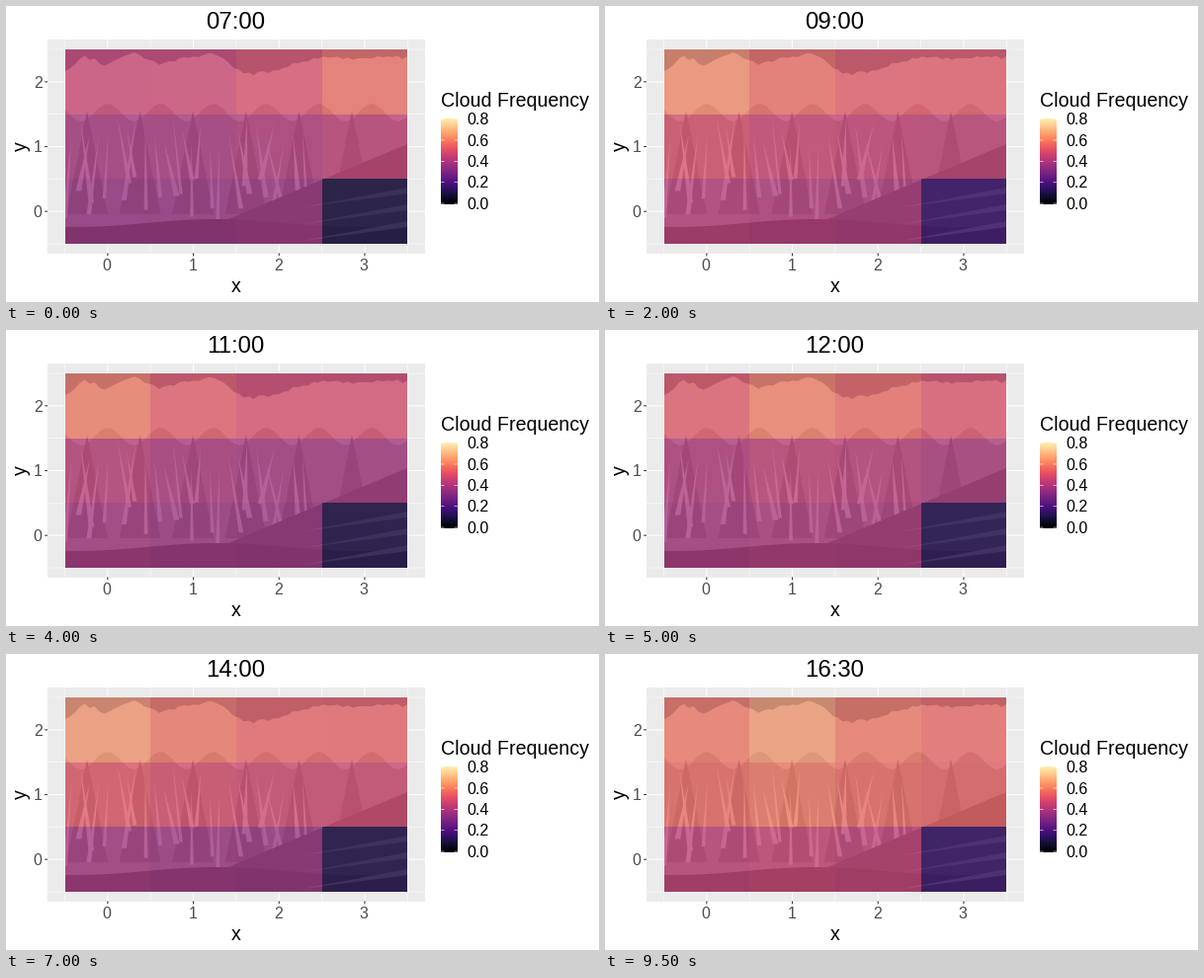
Animation of 600x300 px, one loop 10000 ms. Source, as a matplotlib script:

```python
import numpy as np
import matplotlib.pyplot as plt
from matplotlib.animation import FuncAnimation
from matplotlib.patches import Polygon, Rectangle

plt.rcParams["font.family"] = "Liberation Sans"

DPI = 100
FRAMES, INTERVAL = 20, 500
LEFT, RIGHT, TOP, BOTTOM = 59.5, 406.3, 44, 241
X_EDGES = np.linspace(LEFT, RIGHT, 5)
Y_EDGES = np.linspace(TOP, BOTTOM, 4)
X_CENTERS = (X_EDGES[:-1] + X_EDGES[1:]) / 2
Y_CENTERS = (Y_EDGES[:-1] + Y_EDGES[1:]) / 2

# Key points: each row's cloud level, the shaded corner and the cloudiest column.
KEY_STEPS = [0, 4, 8, 12, 14, 17, 19]
PEAKS = [.57, .64, .60, .63, .66, .66, .67]
SLOPES = [.48, .55, .47, .51, .58, .68, .66]
VALLEY = [.44, .49, .44, .50, .44, .55, .53]
CORNER = [.12, .20, .13, .17, .14, .05, .19]
CLOUDIEST = [3, 0, 0, 2.5, 0, 2.5, 1]
ROW_CONTRAST = np.array([.12, .06, .03])

fig = plt.figure(figsize=(6, 3), dpi=DPI, facecolor="white")
ax = fig.add_axes([0, 0, 1, 1])


def points(pixels):
    return pixels * 72 / DPI


def label(x, y, text, size, color="black", **kwargs):
    return ax.text(x, y, text, fontsize=points(size), color=color,
                   va="baseline", **kwargs)


def line(x0, y0, x1, y1, color, width=1.07, z=1):
    ax.plot([x0, x1], [y0, y1], color=color, lw=points(width), zorder=z,
            solid_capstyle="butt", snap=False)


def draw_panel():
    ax.add_patch(Rectangle((42, 34), 382, 216.5, fc="#EBEBEB", zorder=0))
    for xs, ys, width in ((X_EDGES, Y_EDGES, .55), (X_CENTERS, Y_CENTERS, 1.07)):
        for x in xs:
            line(x, 34, x, 250.5, "white", width)
        for y in ys:
            line(42, y, 424, y, "white", width)
    for i, x in enumerate(X_CENTERS):
        line(x, 250.5, x, 253.3, "#333333")
        label(x - .7, 267.5, str(i), 16, "#4D4D4D", ha="center")
    for i, y in enumerate(Y_CENTERS[::-1]):
        line(39.2, y, 42, y, "#333333")
        label(36.7, y + 5.7, str(i), 16, "#4D4D4D", ha="right")
    label(232.5, 290, "x", 19.6, ha="center")
    label(21, 142.3, "y", 19.6, ha="center", rotation=90,
          rotation_mode="anchor")


def draw_mountains():
    rng = np.random.default_rng(7)
    sky = Rectangle((LEFT, TOP), RIGHT - LEFT, BOTTOM - TOP,
                    fc="#4E5F82", zorder=2)
    ax.add_patch(sky)

    def shape(corners, color):
        patch = Polygon(corners, fc=color, ec="none", zorder=2)
        ax.add_patch(patch)
        patch.set_clip_path(sky)

    def ground(xs, ys, color):
        shape([*zip(xs, ys), (RIGHT, BOTTOM), (LEFT, BOTTOM)], color)

    def wedge(x, y, lean, length, width, color):
        foot = x + lean
        shape([(x, y), (foot + width / 2, y + length),
               (foot - width / 2, y + length)], color)

    xs = np.linspace(LEFT, RIGHT, 70)
    ridge = np.interp(xs, [59, 80, 101, 130, 158, 208, 242, 268, 312, 406],
                      [66, 51, 60, 47, 59, 47, 70, 66, 53, 52])
    ground(xs, ridge + rng.uniform(-2, 2, xs.size), "#BEBCC6")
    ground(xs, 108 + 9 * np.cos((xs - 183) / 8.5), "#948F9A")

    # Rock ribs with snow gullies running down between them.
    for x in np.linspace(82, 350, 6):
        wedge(x, 106, 0, 105, 42, "#736E78")
    for x in np.linspace(66, 300, 26):
        wedge(x, rng.uniform(112, 145), rng.uniform(-16, 16),
              rng.uniform(50, 85), rng.uniform(3, 6), "#CFCCD8")

    ground(xs, np.maximum(140, 213 - .42 * (xs - 232)), "#57535B")
    ground(xs, 220 + 4 * np.sin(xs / 45), "#443F46")
    for y in (192, 209, 226):
        shape([(300, y + 12), (RIGHT, y - 8), (RIGHT, y - 2)], "#857F8A")


def draw_legend():
    left, right, top, bottom = 440, 457, 114.2, 200.6
    label(left, 102, "Cloud Frequency", 19.6)
    ax.imshow(np.linspace(.97, 0, 200)[:, None], cmap="magma", vmin=0, vmax=1,
              extent=(left, right, bottom, top), aspect="auto", zorder=2)
    for i, y in enumerate(np.linspace(200.1, 114.6, 5)):
        line(left, y, left + 3.5, y, "white", .6, z=3)
        line(right - 3.5, y, right, y, "white", .6, z=3)
        label(466.5, y + 5.7, f"{i * .2:.1f}", 16)


def cloud_levels(step):
    def at(values):
        return np.interp(step, KEY_STEPS, values)

    rows = np.array([at(PEAKS), at(SLOPES), at(VALLEY)])
    bump = np.exp(-(np.arange(4) - at(CLOUDIEST)) ** 2)
    levels = rows[:, None] + np.outer(ROW_CONTRAST, bump)
    levels[2, 3] = at(CORNER)
    return levels


draw_panel()
draw_mountains()
draw_legend()
tiles = ax.pcolormesh(X_EDGES, Y_EDGES, cloud_levels(0), cmap="magma",
                      vmin=0, vmax=1, alpha=.7, zorder=4)
title = label(232, 23, "", 24, ha="center")
ax.set_xlim(0, 600)
ax.set_ylim(300, 0)
ax.axis("off")


def update(step):
    tiles.set_array(cloud_levels(step))
    hour, half = divmod(step, 2)
    title.set_text(f"{7 + hour:02d}:{30 * half:02d}")
    return tiles, title


animation = FuncAnimation(fig, update, frames=FRAMES, interval=INTERVAL,
                          repeat=True, repeat_delay=0)
plt.show()
```
